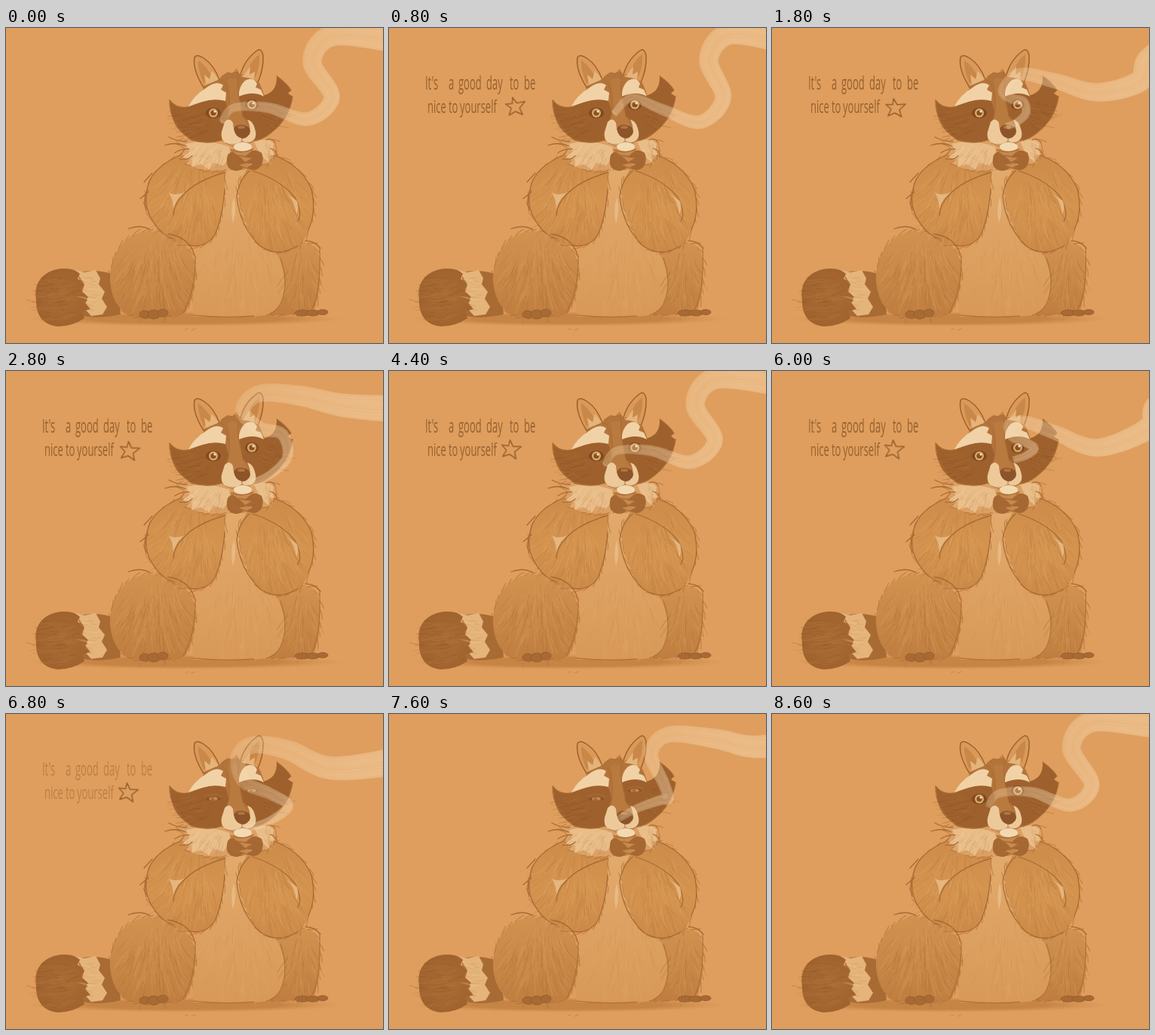
Animation, 500 px wide and 419 px high, one loop 8800 ms. Source, as an HTML page with a canvas:

```html
<!DOCTYPE html>
<html lang="en">
<head>
<meta charset="utf-8">
<title>Raccoon with a warm cup</title>
<style>
html, body { margin: 0; width: 100%; height: 100%; overflow: hidden; background: #df9e5d; }
svg, canvas { position: absolute; left: 0; top: 0; width: 500px; height: 419px; }
.line { fill: none; stroke: #a96a33; stroke-width: 1.3; stroke-linecap: round; stroke-linejoin: round; }
.fur { fill: none; stroke-linecap: round; }
.words { font: 13px "Open Sans", "Noto Sans", sans-serif; fill: #96602f; animation: words 8.8s steps(4) infinite; }
.star { fill: none; stroke: #96602f; stroke-width: 1.5; stroke-linejoin: round; animation: star 8.8s steps(2) infinite; }
.drift { animation: drift 8.8s step-end infinite; }
.wiggle { animation: wiggle .8s step-end infinite; }
.eye { transform-box: fill-box; transform-origin: 50% 50%; animation: blink 8.8s step-end infinite; }
.lid { animation: lid 8.8s step-end infinite; }
@keyframes words { 0% { opacity: 0 } 9.091%, 72.727% { opacity: 1 } 81.818%, 100% { opacity: 0 } }
@keyframes star { 0%, 4.545% { opacity: 0 } 9.091%, 77.273% { opacity: 1 } 81.818%, 100% { opacity: 0 } }
@keyframes drift { 0% { transform: translate(168px, 104px) } 18.182% { transform: translate(164px, 106px) }
  43.182% { transform: translate(162px, 104px) } }
@keyframes wiggle { 0% { transform: rotate(-6deg) } 25% { transform: rotate(1deg) } 50% { transform: rotate(7deg) } 75% { transform: rotate(0) } }
@keyframes blink { 0% { transform: none } 70.455% { transform: scaleY(.6) } 72.727% { transform: scaleY(.22) }
  95.455% { transform: scaleY(.6) } 97.727% { transform: none } }
@keyframes lid { 0% { opacity: 0 } 72.727% { opacity: 1 } 95.455% { opacity: 0 } }
</style>
</head>
<body>
<svg viewBox="0 0 500 419">
  <defs>
    <linearGradient id="arm" x1="0" y1="0" x2="0" y2="1">
      <stop offset="0" stop-color="#cd8b49"/><stop offset=".55" stop-color="#d4944f"/><stop offset="1" stop-color="#cb8947"/>
    </linearGradient>
    <linearGradient id="leg" x1="0" y1="0" x2="0" y2="1">
      <stop offset="0" stop-color="#d19250"/><stop offset="1" stop-color="#bf7e3f"/>
    </linearGradient>
    <linearGradient id="belly" x1="0" y1="0" x2="0" y2="1">
      <stop offset="0" stop-color="#e2aa6c"/><stop offset="1" stop-color="#d89957"/>
    </linearGradient>
    <radialGradient id="tail"><stop offset="0" stop-color="#ab6d35"/><stop offset="1" stop-color="#a0632e"/></radialGradient>
    <radialGradient id="ground"><stop offset=".6" stop-color="#b87638" stop-opacity=".65"/><stop offset="1" stop-color="#c98745" stop-opacity="0"/></radialGradient>
  </defs>

  <ellipse cx="238" cy="387" rx="212" ry="10" fill="url(#ground)"/>

  <!-- tail -->
  <path d="M97 325Q125 319 147 330L152 381Q120 388 98 382Z" fill="#a96b34"/>
  <path d="M92 322L104 325 119 322 125 333 123 341 131 351 127 360 134 371 128 381 113 383 102 371 108 362 101 351 104 341Z" fill="#e4b47a"/>
  <path d="M40 360C36 337 52 321 76 320Q90 319 98 327L95 333 103 342 99 348 109 358 104 364 112 374 101 377 104 386Q88 397 69 397C49 395 39 382 40 360Z" fill="url(#tail)"/>
  <g id="tailFur"></g>

  <!-- legs and belly -->
  <path class="fringe" d="M352 300Q380 284 404 287Q420 300 416 328Q417 357 407 374Q393 383 350 382Z" fill="url(#leg)"/>
  <path d="M290 187L326 187Q322 240 336 284Q360 296 364 311Q376 341 364 368Q354 383 326 384L249 384Q243 350 248 316Q258 294 276 278Q290 240 290 187Z" fill="url(#belly)"/>
  <path class="fringe" d="M236 380Q196 388 160 381Q136 363 138 326Q141 299 159 282Q184 262 216 276Q248 288 251 318Q252 356 236 380Z" fill="url(#leg)"/>
  <g id="legFur"></g>
  <path class="line" d="M251 303Q252 348 235 379M249 382Q290 386 329 383M364 306Q376 340 364 367Q357 379 346 382M416 293Q418 350 406 374" opacity=".75"/>
  <g fill="#a86a34" stroke="#955a29" stroke-width=".8">
    <ellipse cx="184" cy="381" rx="7" ry="5"/><ellipse cx="196" cy="381" rx="8" ry="6"/><ellipse cx="208" cy="379" rx="7" ry="5"/>
    <ellipse cx="393" cy="379" rx="10" ry="4"/><ellipse cx="407" cy="379" rx="9" ry="4"/><ellipse cx="420" cy="378" rx="7" ry="3.5"/>
  </g>
  <path class="line" d="M238 401l3-1M246 402l5-2" opacity=".4"/>

  <!-- arms -->
  <path class="fringe" d="M291 190Q290 240 279 272Q266 294 246 290Q213 284 195 258Q181 238 187 211Q196 184 239 164Q273 170 291 190Z" fill="url(#arm)"/>
  <path class="fringe" d="M326 184Q336 168 352 166Q388 179 405 212Q413 240 402 268Q390 296 365 299Q340 301 326 275Q308 240 309 213Q311 195 326 184Z" fill="url(#arm)"/>
  <g id="armFur"></g>
  <g class="line">
    <path d="M291 192Q252 203 235 222Q222 235 222 249M290 215Q287 252 277 275Q266 293 242 289M239 166Q201 180 190 204Q179 235 196 259Q207 276 223 281"/>
    <path d="M323 190Q309 202 306 224Q310 264 337 290Q361 306 386 290M351 168Q390 180 405 214Q412 246 401 268M327 190Q364 202 383 225Q394 247 387 257"/>
    <path d="M188 215Q181 228 186 243M183 205L194 193M178 227L189 218M162 267Q178 261 191 268M397 283Q409 283 417 293M215 274Q243 278 250 302"/>
  </g>
  <path d="M216 219Q225 224 238 218Q226 226 222 241Q222 229 216 219ZM373 221Q383 230 385 248Q389 240 386 230ZM302 225Q297 241 301 260Q307 240 302 225Z" fill="#eac08b" opacity=".8"/>

  <!-- neck ruff -->
  <path class="fringe" d="M225 150Q249 143 292 151L326 149Q346 143 357 152Q360 168 346 181L324 183 298 187Q263 195 239 180L245 171 232 169 239 162Z" fill="#dba064"/>
  <path d="M239 154Q266 147 296 158L298 171 288 183 275 179 269 188 258 181 246 185 247 175 234 172 243 165ZM329 151Q347 145 355 154L353 163 357 168 348 170 349 179 337 169Z" fill="#e9bd88"/>
  <g id="ruffFur"></g>
  <path class="line" d="M216 145Q227 151 240 151M211 156Q226 151 238 157M224 166Q233 160 243 161M230 174Q240 177 247 170M345 149Q353 145 357 153M350 160Q360 163 359 170"/>

  <!-- ears -->
  <g stroke="#9d602d" stroke-width="1.5">
    <path d="M262 79Q247 55 250 39Q253 34 262 40Q276 49 283 69Z" fill="#d99a59"/>
    <path d="M310 66Q315 43 333 30Q339 26 341 37Q342 55 333 75Z" fill="#d99a59"/>
  </g>
  <path d="M262 74Q254 55 255 43Q268 52 273 66ZM319 67Q321 46 336 35Q337 54 329 69Z" fill="#c98748"/>
  <path d="M265 75L263 62 270 68 273 57 283 69ZM313 66L324 51 323 62 330 58 329 71Z" fill="#e5b47a"/>

  <!-- head -->
  <path d="M262 80Q270 73 282 69Q291 57 300 60L307 57 313 65Q327 66 336 73Q344 89 347 112Q342 143 320 156Q307 163 294 154Q267 139 253 104Z" fill="#b3743b"/>
  <path d="M217 96Q226 108 242 105Q267 93 289 94Q300 115 292 132L286 149Q270 156 247 149Q222 136 219 111Z" fill="#9e612d"/>
  <path d="M309 90Q326 84 340 90Q360 86 359 64Q373 74 378 83L374 87 380 91Q376 120 352 139Q338 150 328 149Q328 129 314 117Z" fill="#9e612d"/>
  <path class="line" d="M217 96Q226 108 242 105M217 96Q216 126 246 149Q268 155 287 149M359 64Q373 74 378 83M380 91Q376 120 352 139Q340 149 329 150" stroke="#864e22"/>
  <path d="M242 104Q250 89 265 80Q279 69 288 76L285 82 292 86 291 97Q276 93 261 98ZM309 91Q308 78 317 70Q328 64 333 74L331 79 338 82 342 91Q328 83 309 91Z" fill="#f1d2a6"/>
  <path d="M294 69Q301 65 308 69Q307 90 313 117L321 131 302 136 293 122Q300 99 294 69Z" fill="#b97a40"/>
  <path class="line" d="M281 69Q289 68 293 79Q299 105 294 119M308 66Q305 90 315 111M286 65L294 59 300 61 306 55 308 64 315 62" opacity=".65"/>
  <g id="headFur"></g>

  <!-- eyes -->
  <g class="eyes">
    <g class="eye" id="eye"><ellipse cx="275" cy="113" rx="10" ry="7" fill="#7f4a20"/><circle cx="275" cy="113" r="6" fill="#dca96c"/><circle cx="275" cy="113" r="3.6" fill="#87501f"/><circle cx="277" cy="111" r="1.6" fill="#f8e3c2"/></g>
    <g class="eye"><ellipse cx="326" cy="102" rx="9" ry="7" fill="#7f4a20"/><circle cx="326" cy="102" r="6" fill="#dca96c"/><circle cx="326" cy="102" r="3.6" fill="#87501f"/><circle cx="328" cy="100" r="1.6" fill="#f8e3c2"/></g>
    <path class="line lid" d="M263 110Q275 103 287 110M317 100Q327 93 336 100" stroke="#75431d"/>
  </g>

  <!-- muzzle -->
  <path d="M290 125Q296 118 301 126Q301 140 311 145L323 142Q325 131 320 122Q328 123 331 138Q333 149 323 153Q306 160 293 154Q284 150 286 138Z" fill="#edc999"/>
  <path d="M302 134Q305 128 314 129Q324 130 324 138Q321 147 313 147Q304 145 302 134Z" fill="#8c5428"/>
  <ellipse cx="312" cy="132" rx="5" ry="2" fill="#ae7543"/>
  <path class="line" d="M313 147L313 151Q301 158 291 153M313 151Q324 156 331 147" opacity=".7"/>

  <!-- cup and paws -->
  <path d="M298 162Q312 155 327 162L323 185Q312 193 299 185Z" fill="#c7894e"/>
  <ellipse cx="314" cy="158" rx="12" ry="6" fill="#f3d9b2"/>
  <path class="line" d="M298 162Q312 168 328 161" stroke="#8b5427"/>
  <path d="M294 169Q299 162 304 167L312 173 319 180 309 182 315 186Q307 193 298 188Q290 183 294 169ZM339 166Q329 160 324 165L316 172 326 173 316 179 327 181 319 186Q330 193 338 184Q343 175 339 166Z" fill="#a66833"/>
  <path class="line" d="M301 165Q299 177 305 182M303 169L318 171M316 179L329 175M309 183L321 187M325 166L336 169M298 179L309 186" stroke="#824a20"/>

  <!-- lettering -->
  <g class="words">
    <text transform="translate(0 82) scale(1 1.9)"><tspan x="48">It's</tspan> <tspan x="79">a</tspan> <tspan x="92">good</tspan> <tspan x="129">day</tspan> <tspan x="160">to</tspan> <tspan x="179">be</tspan></text>
    <text transform="translate(0 113) scale(1 1.8)"><tspan x="51">nice</tspan> <tspan x="79">to</tspan> <tspan x="94">yourself</tspan></text>
  </g>
  <g class="star"><g class="drift"><path class="wiggle" d="M-3-12L2-4 13-5 5 3 8 12-1 7-10 11-6 2-13-4-4-4Z"/></g></g>
</svg>
<canvas width="500" height="419"></canvas>

<script>
const start = performance.now();
const NS = 'http://www.w3.org/2000/svg';
let seed = 17;
const rnd = () => (seed = (seed * 16807) % 2147483647) / 2147483647;

function strokes(host, d, color, width, opacity) {
  const p = document.createElementNS(NS, 'path');
  const look = { d, class: 'fur', stroke: color, 'stroke-width': width, opacity };
  for (const k in look) p.setAttribute(k, look[k]);
  host.append(p);
}
function hair(x, y, len, a) {
  const b = a + (rnd() - .5) * .7, h = len / 2;
  const q = [x, y, x + h * Math.cos(b), y + h * Math.sin(b), x + len * Math.cos(a), y + len * Math.sin(a)].map(v => v.toFixed(1));
  return `M${q[0]} ${q[1]}Q${q.slice(2).join(' ')}`;
}
// Soft hairs inside an ellipse; they lean away from its centre line.
function fur(id, cx, cy, rx, ry, n, len, angle, spread, dark, light) {
  const d = ['', ''];
  for (let i = 0; i < n; i++) {
    const r = Math.sqrt(rnd()), t = rnd() * 6.283, u = r * Math.cos(t);
    d[i % 2] += hair(cx + rx * u, cy + ry * r * Math.sin(t), len * (.5 + rnd()), angle - spread * u + (rnd() - .5) * .3);
  }
  const host = document.getElementById(id);
  strokes(host, d[0], dark, 1, .3);
  strokes(host, d[1], light, 1.1, .3);
}
fur('tailFur', 73, 359, 28, 30, 90, 13, 3, .2, '#8d5525', '#b87b43');
fur('tailFur', 117, 353, 9, 25, 35, 12, 3.3, .2, '#c78b50', '#f1cb98');
fur('legFur', 196, 328, 44, 44, 150, 20, 1.6, .7, '#a96a33', '#dfa565');
fur('legFur', 391, 333, 19, 37, 70, 17, 1.6, .6, '#a96a33', '#dfa565');
fur('legFur', 307, 322, 46, 48, 70, 18, 1.6, .4, '#cb8b4b', '#e4ad70');
fur('armFur', 236, 229, 38, 46, 140, 19, 1.9, .6, '#b37338', '#e2aa6b');
fur('armFur', 359, 235, 36, 48, 140, 19, 1.3, .6, '#b37338', '#e2aa6b');
fur('ruffFur', 266, 167, 26, 13, 60, 12, 2.2, .4, '#bd7e43', '#f4d4a8');
fur('ruffFur', 344, 162, 8, 11, 20, 9, 1.1, .3, '#bd7e43', '#f4d4a8');
fur('headFur', 251, 125, 24, 17, 45, 13, 2.9, .3, '#82491f', '#b1723b');
fur('headFur', 352, 116, 17, 17, 40, 11, .2, .3, '#82491f', '#b1723b');

// Loose wisps along the outer edges.
document.querySelectorAll('.fringe').forEach(p => {
  let d = '';
  const total = p.getTotalLength();
  for (let s = 4; s < total - 4; s += 7 + rnd() * 9) {
    const a = p.getPointAtLength(s), b = p.getPointAtLength(s + 2);
    const dir = Math.atan2(b.y - a.y, b.x - a.x);
    d += hair(a.x, a.y, 5 + rnd() * 9, dir - .35 * rnd());
  }
  const g = document.createElementNS(NS, 'g');
  p.after(g);
  strokes(g, d, '#a96a33', 1.1, .6);
});

// Steam poses, from the nose outwards.
const rest = [[287,124],[302,106],[348,106],[400,121],[432,92],[406,45],[432,10],[507,14]];
const ease = [[300,112],[322,93],[362,108],[412,125],[443,93],[424,42],[450,8],[512,14]];
const high = [[322,150],[350,138],[373,114],[366,84],[336,76],[314,53],[336,30],[390,33],[450,46],[530,50]];
const wide = [[322,84],[345,95],[378,116],[432,132],[474,90],[450,40],[474,6],[520,-22]];
const curl = [[318,152],[350,142],[374,122],[350,106],[316,90],[308,58],[328,41],[374,48],[432,72],[525,62]];
const back = [[287,124],[300,106],[345,104],[396,121],[424,94],[397,45],[425,10],[507,14]];
const COUNT = 13;
const inner = p => [...Array(COUNT - p.length).fill(p[0]), ...p];
const outer = p => {
  const q = p.slice();
  while (q.length < COUNT) { const [x, y] = q[q.length - 1]; q.push([x + 45, y - 6]); }
  return q;
};
const moves = [
  [0, 800, inner(rest), inner(ease)], [800, 2800, inner(ease), outer(high)],
  [2800, 4400, outer(high), outer(rest)], [4400, 5200, inner(rest), inner(wide)],
  [5200, 6800, inner(wide), outer(curl)], [6800, 8600, outer(curl), outer(back)],
  [8600, 8800, outer(back), outer(rest)]
];

function curve(pts) {
  const out = [];
  let len = 0;
  for (let i = 0; i < COUNT - 1; i++) {
    const a = pts[Math.max(0, i - 1)], b = pts[i], c = pts[i + 1], e = pts[Math.min(COUNT - 1, i + 2)];
    for (let u = 0; u < 1; u += 1 / 14) {
      const [x, y] = [0, 1].map(k => b[k] + .5 * u * (c[k] - a[k] + u * (2 * a[k] - 5 * b[k] + 4 * c[k] - e[k] + u * (3 * (b[k] - c[k]) + e[k] - a[k]))));
      const last = out[out.length - 1];
      const step = last ? Math.hypot(x - last.x, y - last.y) : 1;
      if (step < .6) continue;
      len += step;
      out.push({ x, y, w: Math.min(44, 9 + len * .078) });
    }
  }
  out.forEach((p, i) => {
    const a = out[Math.max(0, i - 2)], b = out[Math.min(out.length - 1, i + 2)];
    const d = Math.hypot(b.x - a.x, b.y - a.y) || 1;
    p.nx = (a.y - b.y) / d;
    p.ny = (b.x - a.x) / d;
  });
  return out;
}

const ctx = document.querySelector('canvas').getContext('2d');
const mist = k => {
  const g = ctx.createLinearGradient(280, 0, 470, 0);
  [[0, .4], [.35, .65], [1, 1]].forEach(([s, a]) => g.addColorStop(s, `rgba(247,218,178,${a * k})`));
  return g;
};
const body = mist(.4), bristle = mist(.16);
const trace = (pts, side) => pts.forEach(p => ctx.lineTo(p.x + p.nx * p.w * side, p.y + p.ny * p.w * side));

function draw() {
  const t = Math.floor((performance.now() - start) % 8800 / 200) * 200;
  const [t0, t1, a, b] = moves.find(m => t < m[1]);
  const u = (t - t0) / (t1 - t0);
  const pts = curve(a.map((p, i) => p.map((v, k) => v + (b[i][k] - v) * u)));
  ctx.clearRect(0, 0, 500, 419);
  ctx.fillStyle = body;
  ctx.beginPath();
  trace(pts, -.46);
  trace(pts.slice().reverse(), .46);
  ctx.fill();
  ctx.strokeStyle = bristle;
  ctx.lineJoin = ctx.lineCap = 'round';
  for (let i = 0; i < 9; i++) {
    ctx.lineWidth = 1.5 + i * 5 % 4;
    ctx.beginPath();
    trace(pts.slice(i * 7 % 5), (i - 4) * .115);
    ctx.stroke();
  }
  requestAnimationFrame(draw);
}
draw();
</script>
</body>
</html>
```
